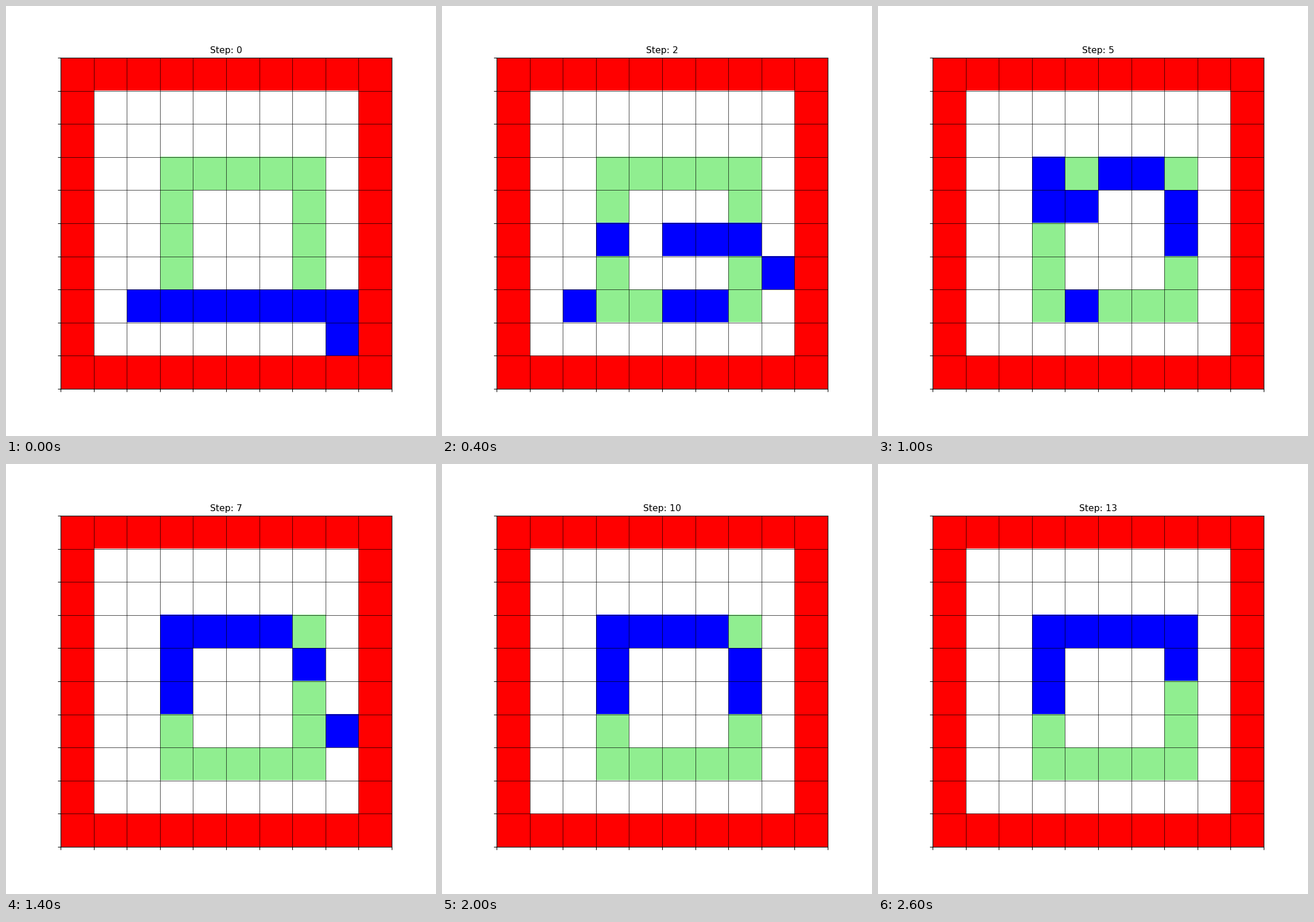
Recreate the animation shown at these times as a matplotlib script. Size 748 by 748 pixels, loop 2800 ms.

```python
import matplotlib.pyplot as plt
import numpy as np
from matplotlib.animation import FuncAnimation
from matplotlib.colors import ListedColormap

STAGE = 748
DPI = 100
SCALE = 0.935
SIZE = 10
STEPS = 14
EMPTY, GOAL, AGENT, WALL = range(4)
COLORS = ListedColormap(["white", "lightgreen", "blue", "red"])

# Compass moves as (row, column) offsets; "-" waits.
MOVES = {"-": (0, 0), "N": (-1, 0), "S": (1, 0), "E": (0, 1), "W": (0, -1),
         "NE": (-1, 1), "NW": (-1, -1), "SW": (1, -1)}

# Start cell and moves of each agent; it rests when its moves run out.
AGENTS = [
    ((7, 2), "NE N N N"),
    ((7, 3), "- W NE N N"),
    ((7, 4), "- E NW N N N"),
    ((7, 5), "N N N N"),
    ((7, 6), "N N N N"),
    ((7, 7), "N N N"),
    ((7, 8), "- N S NW N E S NW SW NE E N NW"),
    ((8, 8), "W NW NW - SW NW N"),
]


def make_board():
    board = np.full((SIZE, SIZE), WALL)
    board[1:-1, 1:-1] = EMPTY
    board[3:8, 3:8] = GOAL
    board[4:7, 4:7] = EMPTY
    return board


def cell_at(start, path, step):
    offsets = [MOVES[m] for m in path.split()[:step]]
    return tuple(np.sum([start] + offsets, axis=0))


def board_at(step):
    board = make_board()
    for start, path in AGENTS:
        board[cell_at(start, path, step)] = AGENT
    return board


plt.rcParams["font.family"] = "DejaVu Sans"
fig = plt.figure(figsize=(STAGE / DPI, STAGE / DPI), dpi=DPI)

# Left, bottom, width, height in pixels; the image rounds its size up.
ax = fig.add_axes(np.array([95, 82, 575.99, 576.01]) / STAGE)
image = ax.imshow(board_at(0), cmap=COLORS, vmin=EMPTY, vmax=WALL,
                  interpolation="nearest", aspect="auto")
title = ax.set_title("Step: 0", fontsize=12 * SCALE, pad=6 * SCALE)

edges = np.arange(-0.5, SIZE)
ax.set_xticks(edges, labels=[])
ax.set_yticks(edges, labels=[])
ax.tick_params(length=3.5 * SCALE)
ax.grid(color="black", linewidth=0.5)


def draw(step):
    image.set_data(board_at(step))
    title.set_text(f"Step: {step}")
    return image, title


anim = FuncAnimation(fig, draw, frames=STEPS, interval=200, repeat=True)
plt.show()
```
